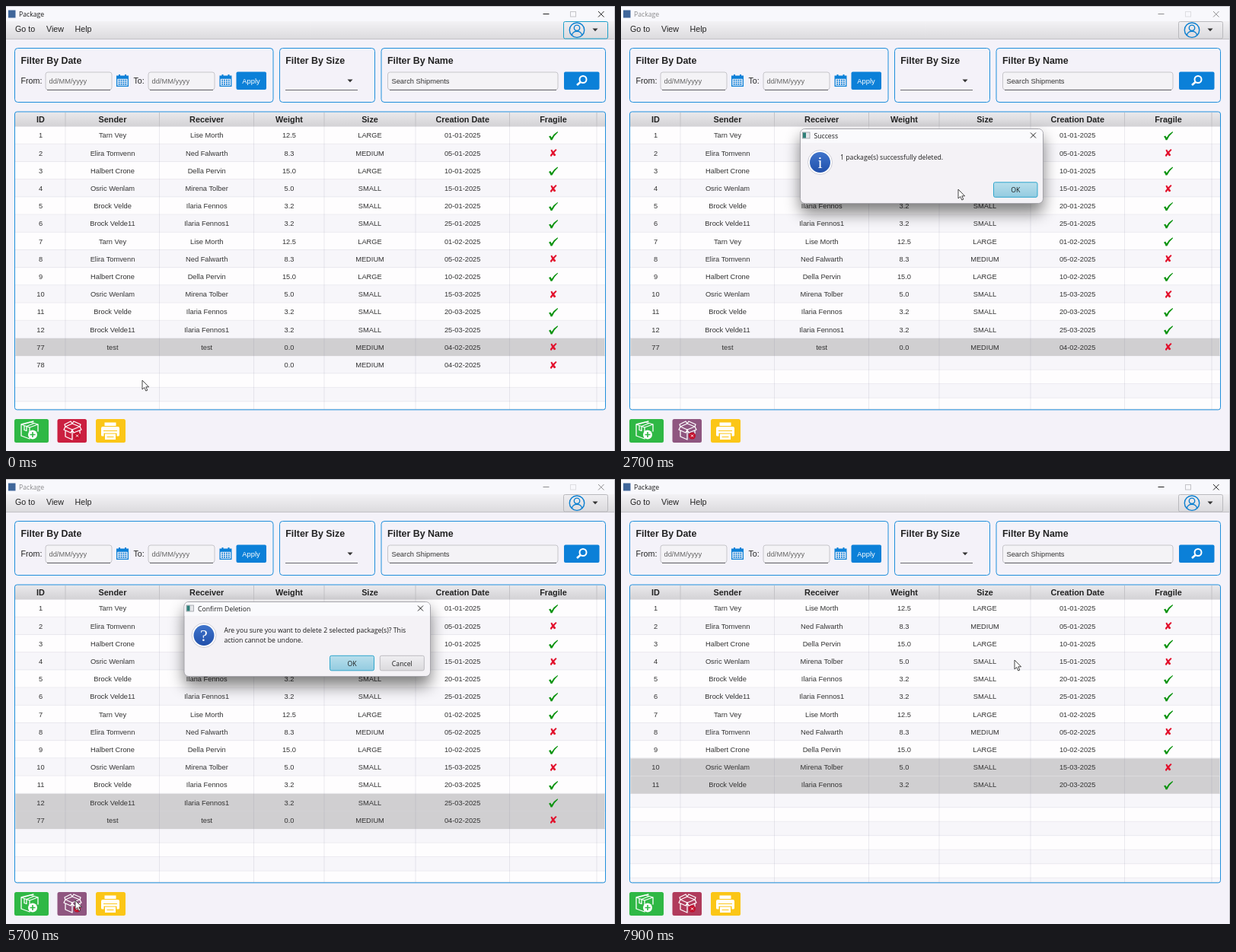
Animation of 800 by 585 pixels, one loop 8000 ms. Source, as an HTML page:

```html
<!DOCTYPE html>
<html lang="en">
<head>
<meta charset="utf-8">
<title>Package</title>
<style>
html, body { margin: 0; width: 100%; height: 100%; overflow: hidden; background: #f4f2f9; }
svg { display: block; width: 800px; height: 585px; }
text { font-family: "Liberation Sans", Arial, sans-serif; font-size: 9.3px; fill: #333; white-space: pre; }
.menu { font-size: 10.7px; fill: #222; }
.head { font-size: 10.85px; font-weight: bold; fill: #222; }
.cap { font-size: 12.4px; font-weight: bold; fill: #222; }
.ui { font-family: "Open Sans", "Noto Sans", sans-serif; font-size: 8.7px; fill: #1c1c1c; }
.sign { font-family: "Liberation Serif", serif; font-size: 22px; fill: #fff; }
.mid { text-anchor: middle; }
.hint { fill: #666; }
.panel { fill: #f4f2f9; stroke: #1f8fdb; }
.field { fill: #f4f3f6; stroke: #c6c5ca; }
.under { stroke: #6b6b6f; }
.blue { fill: #0b80d8; }
.line { fill: none; stroke: #fff; stroke-linejoin: round; stroke-linecap: round; stroke-width: 1.3; }
.no { font-family: "DejaVu Sans", sans-serif; font-size: 13.5px; fill: #e2102c; }

/* Every change of state is a hard step on one 8 s clock. */
.a { animation: 8s step-end infinite; }
.row { fill: #333; }
.row text:not(.no) { fill: inherit; }
.sel { fill: transparent; }
#sel10, #sel11 { animation-name: selNext; }
#sel12 { animation-name: sel12; }
#sel77 { animation-name: sel77; }
#sel78 { animation-name: sel78; }
#row12 { animation-name: ink12; }
#row77 { animation-name: ink77; }
#row78 { animation-name: ink78; }
#rest14 { animation-name: first; }
#rest13 { animation-name: second; }
#rest11 { animation-name: third; }
#user { stroke: #b9b9bd; animation-name: user; }
#frame { animation-name: frame; }
#del { animation-name: del; }
#cap, #ctl { animation-name: dim; }
#ask1 { animation-name: ask1; }
#done1 { animation-name: done1; }
#ask2 { animation-name: ask2; }
#done2 { animation-name: done2; }
#arrow { animation-name: arrow; }
#hand { animation-name: hand; }
#cursor { animation: move 8s ease-in-out infinite; }

@keyframes selNext { 0% { fill: transparent } 83.75%, 100% { fill: #d0cfd1 } }
@keyframes sel12 { 0% { fill: transparent } 58.75% { fill: #0fa0c8 } 68.75% { fill: #d0cfd1 } 83.75%, 100% { fill: transparent } }
@keyframes sel77 { 0% { fill: #d0cfd1 } 6.25% { fill: transparent } 30% { fill: #d0cfd1 } 57.5% { fill: #0fa0c8 } 68.75% { fill: #d0cfd1 } 83.75%, 100% { fill: transparent } }
@keyframes sel78 { 0% { fill: transparent } 6.25% { fill: #0fa0c8 } 17.5% { fill: #d0cfd1 } 30%, 100% { fill: transparent } }
@keyframes ink12 { 0% { fill: #333; opacity: 1 } 58.75% { fill: #fff; opacity: 1 } 68.75% { fill: #333; opacity: 1 } 83.75%, 100% { opacity: 0 } }
@keyframes ink77 { 0% { fill: #333; opacity: 1 } 57.5% { fill: #fff; opacity: 1 } 68.75% { fill: #333; opacity: 1 } 83.75%, 100% { opacity: 0 } }
@keyframes ink78 { 0% { fill: #333; opacity: 1 } 6.25% { fill: #fff; opacity: 1 } 17.5% { fill: #333; opacity: 1 } 30%, 100% { opacity: 0 } }
@keyframes first { 0% { opacity: 1 } 30%, 100% { opacity: 0 } }
@keyframes second { 0% { opacity: 0 } 30% { opacity: 1 } 83.75%, 100% { opacity: 0 } }
@keyframes third { 0% { opacity: 0 } 83.75%, 100% { opacity: 1 } }
@keyframes user { 0% { stroke: #1b9fc9 } 6.25%, 100% { stroke: #b9b9bd } }
@keyframes frame { 0% { stroke-width: 1 } 6.25% { stroke-width: 1.8 } 17.5% { stroke-width: 1 } 57.5% { stroke-width: 1.8 } 68.75%, 100% { stroke-width: 1 } }
@keyframes del { 0% { fill: #cb1f40 } 11.25% { fill: #b32a4c } 21.25% { fill: #8f5680 } 40% { fill: #b03b5c } 46.25% { fill: #cb1f40 } 66.25% { fill: #b32a4c } 71.25% { fill: #8f5680 } 93.75%, 100% { fill: #b03b5c } }
@keyframes dim { 0% { opacity: 1 } 21.25% { opacity: .5 } 40% { opacity: 1 } 71.25% { opacity: .5 } 93.75%, 100% { opacity: 1 } }
@keyframes ask1 { 0% { opacity: 0 } 21.25% { opacity: 1 } 28.75%, 100% { opacity: 0 } }
@keyframes done1 { 0% { opacity: 0 } 30% { opacity: 1 } 40%, 100% { opacity: 0 } }
@keyframes ask2 { 0% { opacity: 0 } 71.25% { opacity: 1 } 82.5%, 100% { opacity: 0 } }
@keyframes done2 { 0% { opacity: 0 } 83.75% { opacity: 1 } 93.75%, 100% { opacity: 0 } }
@keyframes hand { 0% { opacity: 0 } 11% { opacity: 1 } 21.25% { opacity: 0 } 66% { opacity: 1 } 71.25%, 100% { opacity: 0 } }
@keyframes arrow { 0% { opacity: 1 } 11% { opacity: 0 } 21.25% { opacity: 1 } 66% { opacity: 0 } 71.25%, 100% { opacity: 1 } }
@keyframes move {
  0%, 2.5% { transform: translate(179px, 492px) }
  6.25%, 7.5% { transform: translate(164px, 469px) }
  11.25%, 21.25% { transform: translate(91px, 554px) }
  26.25%, 28.75% { transform: translate(445px, 243px) }
  33.75% { transform: translate(443px, 241px) }
  37.5%, 46.25% { transform: translate(513px, 243px) }
  56.25%, 57.5% { transform: translate(160px, 447px) }
  58.75%, 61.25% { transform: translate(160px, 427px) }
  66.25%, 72.5% { transform: translate(91px, 554px) }
  78.75% { transform: translate(484px, 284px) }
  81.25%, 85% { transform: translate(452px, 243px) }
  91.25%, 100% { transform: translate(517px, 238px) }
}
</style>
</head>
<body>
<svg viewBox="0 0 800 585">
  <defs>
    <linearGradient id="bar" x2="0" y2="1"><stop stop-color="#f3f2f5"/><stop offset="1" stop-color="#dcdbde"/></linearGradient>
    <linearGradient id="th" x2="0" y2="1"><stop stop-color="#eae9ec"/><stop offset="1" stop-color="#d3d2d5"/></linearGradient>
    <linearGradient id="btn" x2="0" y2="1"><stop stop-color="#f0eff2"/><stop offset="1" stop-color="#dbdadd"/></linearGradient>
    <linearGradient id="okbg" x2="0" y2="1"><stop stop-color="#b9dfec"/><stop offset="1" stop-color="#93cbe0"/></linearGradient>
    <linearGradient id="ball" x2="0" y2="1"><stop stop-color="#3f74cb"/><stop offset="1" stop-color="#2150ab"/></linearGradient>
    <filter id="soft" x="-20%" y="-50%" width="140%" height="200%"><feGaussianBlur stdDeviation="10"/></filter>
    <g id="cal">
      <path class="blue" d="M0 1.500h16v14.500H0zM3 0h2v3H3zM11 0h2v3h-2z"/>
      <path fill="#f4f2f9" d="M1.300 5.800h13.400v8.900H1.300z"/>
      <path stroke="#0b80d8" stroke-width="1.700" stroke-dasharray="1.900 1" d="M2.700 7.700h10.600M2.700 10.300h10.600M2.700 12.900h10.600"/>
    </g>
    <path id="yes" fill="#0b930f" d="M-6 1l2.200-1.200 1.600 2.700q2.700-5 7.700-8l.6.900q-5 4.300-7.700 10.200h-1.900q-.7-2.500-2.500-4.600z"/>
  </defs>

  <rect width="800" height="585" fill="#f4f2f9"/>
  <rect width="800" height="20" fill="#f8f8fc"/>
  <path stroke="#c6c6cc" d="M0 .5h800M799.500 0v585"/>
  <rect x="3" y="5.500" width="9.500" height="10" fill="#40669a"/>
  <text id="cap" class="ui a" x="17" y="14">Package</text>
  <g id="ctl" class="a" fill="none" stroke="#222">
    <path d="M705.500 10.500h8M778 7l7.500 7.500M785.500 7l-7.500 7.500"/>
    <rect x="741.500" y="7.500" width="7" height="6.500" stroke="#c4c4c8"/>
  </g>

  <rect y="20" width="799" height="23" fill="url(#bar)"/>
  <path stroke="#c3c2c6" d="M0 43.500h799"/>
  <text class="menu" x="12" y="34">Go to</text>
  <text class="menu" x="53" y="34">View</text>
  <text class="menu" x="90.500" y="34">Help</text>
  <rect id="user" class="a" x="732.500" y="20.500" width="58" height="22.500" rx="2" fill="url(#btn)"/>
  <g fill="none" stroke="#0b7fd0" stroke-width="1.400">
    <circle cx="750" cy="31.700" r="9.700"/>
    <circle cx="750" cy="28.800" r="3.700"/>
    <path d="M743.500 38.500c.5-7 12.500-7 13 0"/>
  </g>
  <path fill="#333" d="M770.500 29.500h7l-3.500 3.700z"/>

  <rect class="panel" x="11.500" y="55.500" width="339.500" height="71" rx="4"/>
  <rect class="panel" x="359.500" y="55.500" width="125" height="71" rx="4"/>
  <rect class="panel" x="493" y="55.500" width="294.500" height="71" rx="4"/>
  <text class="cap" x="19.500" y="76">Filter By Date</text>
  <text class="cap" x="367.300" y="76">Filter By Size</text>
  <text class="cap" x="501" y="76">Filter By Name</text>
  <text class="menu" x="19.500" y="102">From:</text>
  <text class="menu" x="167.500" y="102">To:</text>
  <rect class="field" x="52" y="87" width="87" height="23" rx="3"/>
  <rect class="field" x="187" y="87" width="87" height="23" rx="3"/>
  <rect class="field" x="501.500" y="87" width="223.500" height="23" rx="3"/>
  <path class="under" d="M54 110.500h83M189 110.500h83M367 110.500h95M504 110.500h219"/>
  <text class="hint" x="56.500" y="102">dd/MM/yyyy</text>
  <text class="hint" x="191.500" y="102">dd/MM/yyyy</text>
  <text x="506.500" y="102">Search Shipments</text>
  <use href="#cal" x="145" y="90"/>
  <use href="#cal" x="280.500" y="90"/>
  <rect class="blue" x="302.500" y="86.500" width="39.500" height="23.500" rx="2"/>
  <text class="mid" x="322" y="102" style="fill:#fff">Apply</text>
  <path fill="#333" d="M448.500 96.500h7l-3.500 3.700z"/>
  <rect class="blue" x="733" y="86.500" width="46.500" height="23.500" rx="2"/>
  <g fill="none" stroke="#fff" stroke-width="2"><circle cx="758" cy="96.500" r="4.500"/><path stroke-width="2.600" d="M754.500 100l-4.500 4"/></g>

  <g id="table"></g>
  <rect id="frame" class="a" x="11.500" y="139" width="776" height="391.800" rx="3" fill="none" stroke="#1f8fdb"/>

  <rect x="11" y="543" width="45" height="31" rx="2.500" fill="#2fb845"/>
  <path class="line" d="M20 550l12-3 10 3-11 4zM20 550v15l11 4M31 554v14M42 550v9M25 549l11-3M24 551.500v6l3 1v-6l10-4"/>
  <circle cx="35" cy="563.500" r="6" fill="#fff"/>
  <path stroke="#2fb845" stroke-width="1.600" d="M31.500 563.500h7M35 560v7"/>

  <rect id="del" class="a" x="67.500" y="543" width="38.500" height="31" rx="2.500"/>
  <path class="line" d="M78 553l9-4 10 4-10 4zM78 553l-2 4 9 4 2-4 2 4 10-4-2-4M78 559v7l9 4v-13M97 558v4M78 553l-1-3 8-4 2 3 2-3 9 4-1 3"/>
  <circle cx="93.500" cy="565" r="4.500" fill="#c4102c"/>
  <path stroke="#fff" d="M92 563.500l3 3M95 563.500l-3 3"/>

  <rect x="118" y="543" width="39" height="31" rx="2.500" fill="#fbc617"/>
  <path fill="#fff" d="M129.500 547.500h15v4.500h-15zM127 553h20q2 0 2 2v9q0 1.500-1.500 1.500h-2v-4h-17v4h-2q-1.500 0-1.500-1.500v-9q0-2 2-2zM130 562.500h14v7.500h-14z"/>
  <path stroke="#fbc617" d="M128 558.500h18M132.500 566.500h9"/>

  <g id="dialogs"></g>

  <g id="cursor">
    <path id="arrow" class="a" fill="#fff" stroke="#333" stroke-width=".9" d="M0 0v12l2.800-2.500 2 4.500 2-.9-2-4.300h3.800z"/>
    <path id="hand" class="a" fill="#fff" stroke="#222" stroke-width=".8" d="M-1.300 1q1.300-2 2.600 0v5l1-.8 1.500 1 1.200-.5 1 1.200 1.300 0 .6 1.500v4l-1.500 4.500h-6l-3.600-5-1.700-3q1-1.500 3.600 1.500z"/>
  </g>
</svg>
<script>
const ROW = 23.2, TOP = 158.6, BOTTOM = 530.3, GAP = 18.5;
const edges = [78, 201.5, 325.5, 418, 538, 661.5, 776];
const centres = [45.5, 140, 263.7, 372, 478, 599.7, 719];
const heads = ["ID", "Sender", "Receiver", "Weight", "Size", "Creation Date", "Fragile"];
const people = [
  ["Tarn Vey", "Lise Morth", "12.5", "LARGE", 1],
  ["Elira Tomvenn", "Ned Falwarth", "8.3", "MEDIUM", 0],
  ["Halbert Crone", "Della Pervin", "15.0", "LARGE", 1],
  ["Osric Wenlam", "Mirena Tolber", "5.0", "SMALL", 0],
  ["Brock Velde", "Ilaria Fennos", "3.2", "SMALL", 1],
  ["Brock Velde11", "Ilaria Fennos1", "3.2", "SMALL", 1]
];
const days = ["01", "05", "10", "15", "20", "25"];

const rows = [];
for (let i = 0; i < 12; i++) {
  const [from, to, weight, size, ok] = people[i % 6];
  const month = i < 6 ? "01" : i < 9 ? "02" : "03";
  rows.push([i + 1, from, to, weight, size, `${days[i % 6]}-${month}-2025`, ok]);
}
rows.push([77, "test", "test", "0.0", "MEDIUM", "04-02-2025", 0]);
rows.push([78, "", "", "0.0", "MEDIUM", "04-02-2025", 0]);

const text = (x, y, s, cls) => `<text class="${cls}" x="${x}" y="${y}">${s}</text>`;
const rect = (x, y, w, h, more) => `<rect x="${x}" y="${y}" width="${w}" height="${h}" ${more}/>`;
const stripe = i => i % 2 ? "#f7f6fa" : "#fefdfe";

function band(i, y, h) {
  return rect(12, y, 775, h, `fill="${stripe(i)}"`) +
    `<path stroke="#e9e8ee" d="M12 ${y + h - .5}h775"/>`;
}

// Blank striped rows that fill the table below the last record
function rest(count) {
  let out = "", i = count;
  for (let y = TOP + count * ROW; y < BOTTOM; y += GAP, i++)
    out += band(i, y, Math.min(GAP, BOTTOM - y));
  return `<g id="rest${count}" class="a">${out}</g>`;
}

function record(r, i) {
  const y = TOP + i * ROW + 14.8;
  const cells = r.slice(0, 6).map((s, c) => text(centres[c], y, s, "mid"));
  const mark = r[6] ? `<use href="#yes" x="719" y="${y - 2.8}"/>` : text(719, y + 1.6, "✘", "mid no");
  return `<g id="row${r[0]}" class="row a">${cells.join("")}${mark}</g>`;
}

const lines = (y, h, color) =>
  `<path stroke="${color}" d="${edges.map(x => `M${x} ${y}v${h}`).join("")}"/>`;

document.getElementById("table").innerHTML =
  rows.map((r, i) => band(i, TOP + i * ROW, ROW)).join("") +
  [14, 13, 11].map(rest).join("") +
  rows.map((r, i) => rect(12.5, TOP + i * ROW, 774, ROW - .1, `id="sel${r[0]}" class="sel a"`)).join("") +
  lines(TOP, BOTTOM - TOP, "rgba(120,120,150,.15)") +
  rows.map(record).join("") +
  rect(12, 139.5, 775, 19, 'fill="url(#th)"') +
  lines(140, 18.5, "#c3c2c6") +
  heads.map((s, c) => text(centres[c], 153, s, "mid head")).join("");

function button(x, y, w, label, main) {
  const paint = main ? 'fill="url(#okbg)" stroke="#2fa6cc"' : 'fill="url(#btn)" stroke="#bcbbc0"';
  return rect(x, y, w, 19.5, `rx="2" ${paint}`) + text(x + w / 2, y + 13.2, label, "mid ui");
}

function dialog(id, x, w, title, sign, body) {
  const cx = x + 26, close = x + w - 13;
  return `<g id="${id}" class="a">` +
    rect(x, 171, w, 101, 'rx="8" fill="#000" opacity=".5" filter="url(#soft)"') +
    rect(x, 161.5, w, 98, 'rx="6" fill="#f4f2f6" stroke="#a5a4aa"') +
    `<path fill="#fafafd" d="M${x + .5} 180v-12q0-6 6-6h${w - 13}q6 0 6 6v12z"/>` +
    rect(x + 3, 166, 9.5, 8, 'fill="#e6e6ea" stroke="#8a8f94" stroke-width=".7"') +
    rect(x + 3.5, 166.5, 4, 7, 'fill="#2f7f78"') +
    text(x + 18, 173.5, title, "ui") +
    `<path stroke="#222" d="M${close - 3.5} 166.500l7 7m0-7l-7 7"/>` +
    `<circle cx="${cx}" cy="205.500" r="16" fill="#fff" stroke="#cfced6"/>` +
    `<circle cx="${cx}" cy="205.500" r="13.500" fill="url(#ball)"/>` +
    text(cx, 212.7, sign, "mid sign") + body + "</g>";
}

const ask = n => dialog("ask" + n, 234, 323.5, "Confirm Deletion", "?",
  text(286.5, 202, `Are you sure you want to delete ${n} selected package(s)? This`, "ui") +
  text(286.5, 215, "action cannot be undone.", "ui") +
  button(425.5, 232.3, 58, "OK", true) + button(491.3, 232.3, 58, "Cancel"));

const done = n => dialog("done" + n, 235.5, 319, "Success", "i",
  text(288, 202, `${n} package(s) successfully deleted.`, "ui") +
  button(489.5, 231.8, 57.5, "OK", true));

document.getElementById("dialogs").innerHTML = [1, 2].map(n => ask(n) + done(n)).join("");
</script>
</body>
</html>
```
